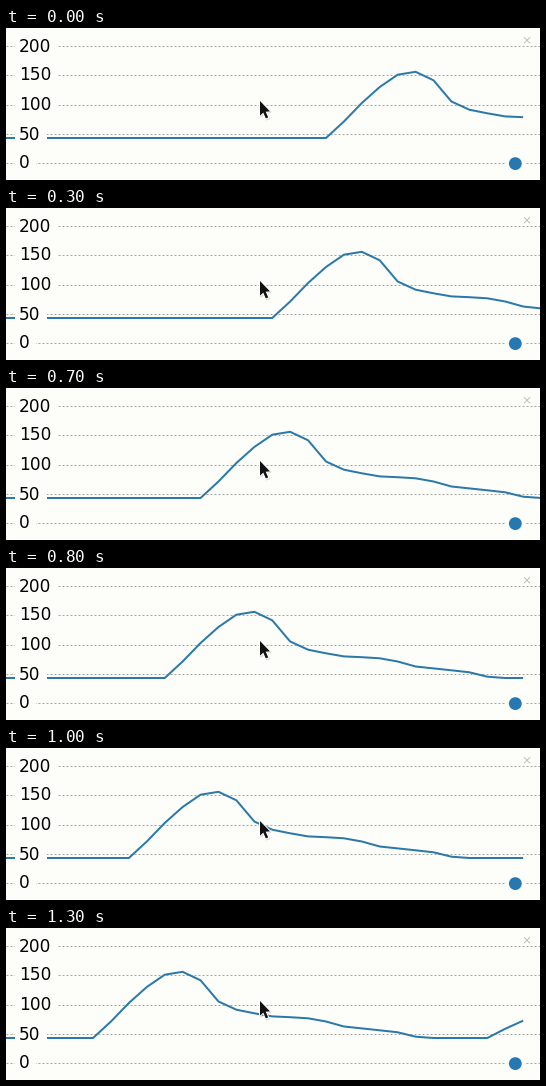
Recreate the animation shown at these times as a matplotlib script. Size 534 px wide and 152 px high, loop 1400 ms.

```python
import matplotlib.pyplot as plt
from matplotlib.animation import FuncAnimation
from matplotlib.patches import Circle, Polygon, Rectangle

W, H, DPI = 534, 152, 100
PX = 72 / DPI  # points per pixel
BG = "#fdfdfa"
LINE = "#2a79a9"
STEP = 17.92   # pixels between samples
ONSET = 320    # x of the first rise before any scrolling

# Line heights in pixels, from the first rise onwards
HEIGHTS = [110, 93.5, 75, 59, 46.7, 43.8, 52.3, 73.5, 81.7, 85.3, 88.4, 89.2,
           90.3, 93.5, 98.5, 100.4, 102.3, 104.3, 108.7, 110, 110, 110, 110,
           100.8, 92.7]

# Per tick: newest sample and how many samples the view has scrolled
NEWEST = [11, 12, 13, 15, 15, 17, 18, 19, 20, 21, 22, 23, 24, 24]
SCROLL = [0, 1, 2, 3, 3, 6, 7, 7, 9, 10, 11, 12, 12, 13]

fig = plt.figure(figsize=(W / DPI, H / DPI), dpi=DPI, facecolor=BG)
ax = fig.add_axes([0, 0, 1, 1])
ax.set_xlim(0, W)
ax.set_ylim(H, 0)
ax.axis("off")


def blank(x0, x1, y, half, z):
    ax.add_patch(Rectangle((x0, y - half), x1 - x0, 2 * half,
                           facecolor=BG, edgecolor="none", zorder=z))


def draw_scale():
    for value in (0, 50, 100, 150, 200):
        y = round(134.2 - value * 0.586) + 0.5
        ax.plot([0, W], [y, y], color="#a6a6a4", lw=PX,
                linestyle=(0, (2, 2)), zorder=1)
        label = str(value)
        blank(9, 19.4 + 10.8 * len(label), y, 9, 4)
        ax.text(13, y + 6, label, fontsize=17 * PX, family="DejaVu Sans",
                color="black", va="baseline", zorder=5)


def draw_marks():
    blank(500, 519, 134.5, 9, 2)
    ax.add_patch(Circle((509.3, 135.6), 6.4, facecolor="#2778b0",
                        edgecolor="none", zorder=5))
    for dy in (-2.7, 2.7):
        ax.plot([518.3, 523.7], [12.3 - dy, 12.3 + dy], color="#b9b9b7",
                lw=0.9 * PX, zorder=5)


def draw_pointer():
    arrow = [(0, 0), (0, 14.6), (3.3, 11.6), (5.8, 17.4), (8.2, 16.4),
             (5.7, 10.7), (10, 10.4)]
    for dx, dy, edge, width, alpha in ((0.8, 1, "black", 2, 0.12),
                                       (0, 0, "white", 2, 1)):
        points = [(254 + x + dx, 73 + y + dy) for x, y in arrow]
        ax.add_patch(Polygon(points, facecolor="#111111", edgecolor=edge,
                             lw=width * PX, alpha=alpha, zorder=8))
    ax.add_patch(Polygon(points, facecolor="#111111", edgecolor="none",
                         zorder=9))


draw_scale()
draw_marks()
draw_pointer()
curve, = ax.plot([], [], color=LINE, lw=2 * PX, solid_capstyle="butt",
                 solid_joinstyle="round", zorder=3)


def update(tick):
    start = ONSET - SCROLL[tick] * STEP
    heights = HEIGHTS[:NEWEST[tick] + 1]
    xs = [start + i * STEP for i in range(len(heights))]
    curve.set_data([-5] + xs, [HEIGHTS[0]] + heights)
    return curve,


anim = FuncAnimation(fig, update, frames=len(NEWEST), interval=100,
                     repeat=True, repeat_delay=0)
plt.show()
```
